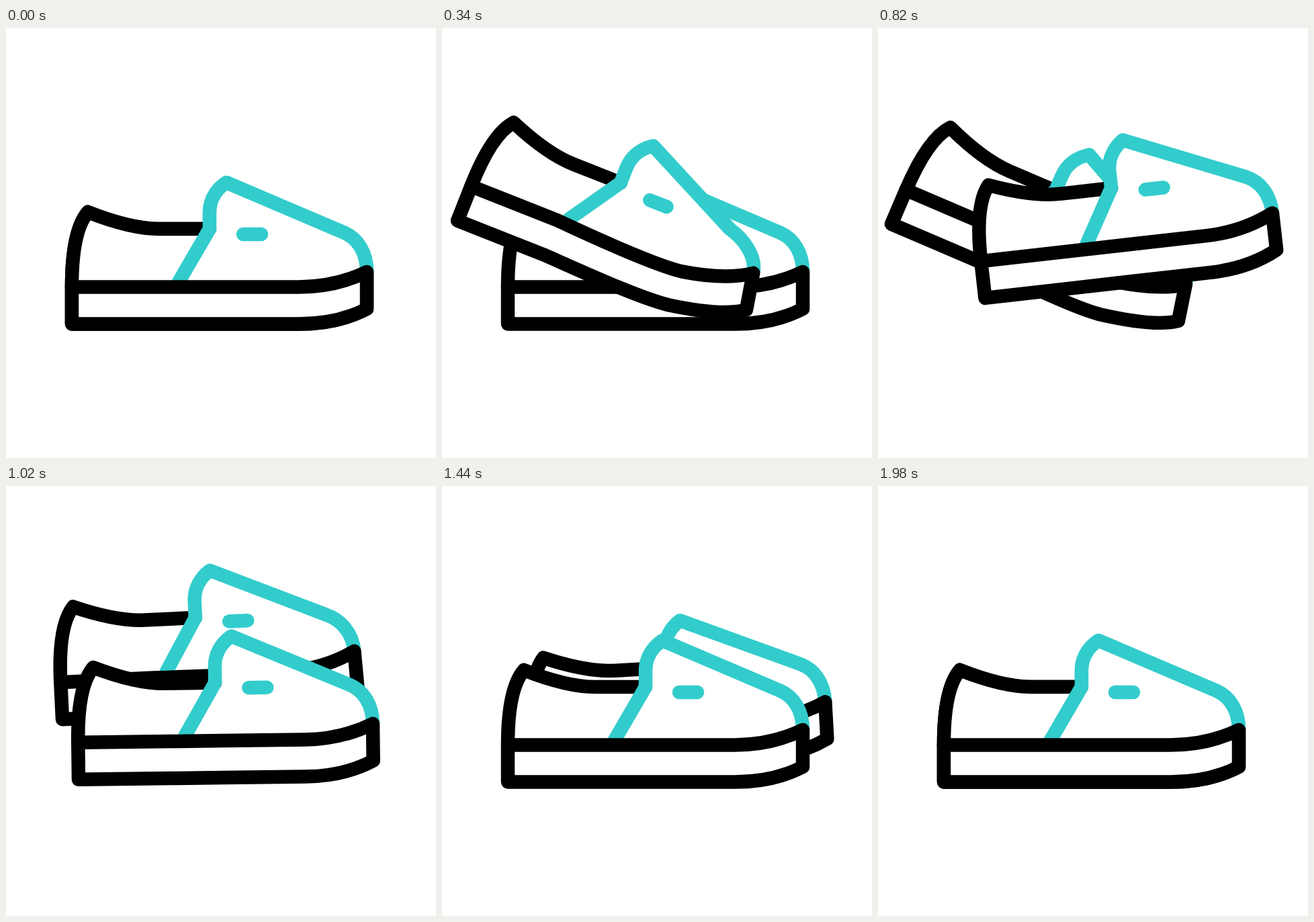
These frames come from a looping animation (640 by 640 pixels, 2400 ms). An HTML page:

```html
<!DOCTYPE html>
<html lang="en">
<head>
<meta charset="utf-8">
<title>Walking slip-ons</title>
<style>
  html, body { margin: 0; width: 100%; height: 100%; overflow: hidden; background: #fff; }
  svg { display: block; width: 100%; height: 100%; }
  path { fill: none; stroke-width: 20.5; stroke-linecap: round; stroke-linejoin: round; }
  .teal { stroke: #3cc; }
  .black { stroke: #000; }
  .white { fill: #fff; }
</style>
</head>
<body>
<svg viewBox="0 0 640 640" xmlns="http://www.w3.org/2000/svg">
  <g id="sparks"></g>
  <g id="shoes"></g>
</svg>
<script>
const LOOP = 2400;
const STEP_DELAY = 520;

// One step of a shoe: time, centre x, centre y, angle, toe bend
const STEP = [
  [0, 320, 340, 0, 0],
  [80, 296.5, 336.9, 6.9, 0.75],
  [300, 263.6, 287, 23.2, 1.08],
  [340, 266.4, 275.1, 21.6, 1],
  [540, 311, 228, -7.5, 0.1],
  [600, 326.5, 216.5, -11.6, 0],
  [720, 369.2, 235.3, -10.2, 0],
  [820, 368.8, 276.7, -6.5, 0],
  [1100, 320, 340, 0, 0]
];

// Radial strokes: direction, start radius, end radius, delay
const SPARK_CENTRE = [456, 214];
const SPARKS = [
  [-101.8, 62, 125, 0],
  [-56.5, 54, 131, 0],
  [-14.4, 120, 70, 45]
];

const clamp01 = v => Math.max(0, Math.min(1, v));

function add(parent, tag, className) {
  const node = document.createElementNS("http://www.w3.org/2000/svg", tag);
  if (className) node.setAttribute("class", className);
  return parent.appendChild(node);
}

function tangent(i, k) {
  if (i === 0 || i === STEP.length - 1) return 0;
  const [a, b, c] = [STEP[i - 1], STEP[i], STEP[i + 1]];
  const h0 = b[0] - a[0], h1 = c[0] - b[0];
  const s0 = (b[k] - a[k]) / h0, s1 = (c[k] - b[k]) / h1;
  return (s0 * h1 + s1 * h0) / (h0 + h1);
}

// Smooth cubic interpolation through the step keys
function poseAt(time) {
  const last = STEP.length - 1;
  const t = Math.max(0, Math.min(STEP[last][0], time));
  let i = 0;
  while (i < last - 1 && t > STEP[i + 1][0]) i++;
  const h = STEP[i + 1][0] - STEP[i][0];
  const u = (t - STEP[i][0]) / h, v = 1 - u;
  return [1, 2, 3, 4].map(k =>
    STEP[i][k] * (1 + 2 * u) * v * v + STEP[i + 1][k] * u * u * (3 - 2 * u) +
    h * u * v * (v * tangent(i, k) - u * tangent(i + 1, k)));
}

function makeShoe(parent) {
  const group = add(parent, "g");
  const fill = add(group, "path", "white");
  const back = add(group, "path", "black");
  const vamp = add(group, "path", "teal");
  const dash = add(group, "path", "teal");
  const sole = add(group, "path", "black white");
  const heelLine = "M98 385.4C98 340 103 296 122 274C155 287 193 299 228 299H303";
  back.setAttribute("d", heelLine);
  dash.setAttribute("d", "M353 307H380");

  return time => {
    const [x, y, angle, bend] = poseAt(time);
    const p = (px, py, dx, dy) => `${px + dx * bend} ${py + dy * bend} `;
    const toe = p(537, 363, -1, -11.5);
    const front = "V275C303 256 313 240 328 230L" + p(504, 305, -25, -2) +
      "C" + p(524, 314, -23.7, -5.6) + p(537, 335, -5.9, -11) + toe;
    fill.setAttribute("d", heelLine + front + "L436 390H98Z");
    vamp.setAttribute("d", "M" + p(257, 378, -6, 0) + "L303 299" + front);
    sole.setAttribute("d", "M98 385.4H236C" +
      p(300, 385.4, 0, 4) + p(390, 385.4, 0, 9) + p(436, 385.4, 0, 3) +
      "C" + p(475, 385.4, -0.6, -4) + p(510, 376, 1.5, -7) + toe +
      "L" + p(537, 418, 9.5, -12) +
      "C" + p(510, 432, 12, -7.4) + p(475, 440.5, -0.6, -5) + p(436, 440.5, 0, 1.5) +
      "C" + p(390, 440.5, 0, 7.5) + p(300, 440.5, 0, 2.5) + "236 440.5" +
      "L98 440.5Z");
    group.setAttribute("transform",
      `translate(${x} ${y}) rotate(${angle}) translate(-320 -340)`);
  };
}

function makeSpark(parent, [degrees, from, to, delay]) {
  const path = add(parent, "path", "teal");
  const rad = degrees * Math.PI / 180;
  const point = part => {
    const r = from + (to - from) * part;
    return `${SPARK_CENTRE[0] + r * Math.cos(rad)} ${SPARK_CENTRE[1] + r * Math.sin(rad)}`;
  };
  return time => {
    const head = clamp01((time - 1620 - delay) / 103);
    const tail = clamp01((time - 1830 - delay) / 103);
    path.setAttribute("d", head > tail ? `M${point(tail)}L${point(head)}` : "");
  };
}

const shoes = document.getElementById("shoes");
const rearShoe = makeShoe(shoes);
const frontShoe = makeShoe(shoes);
const sparks = SPARKS.map(s => makeSpark(document.getElementById("sparks"), s));

function draw(time) {
  frontShoe(time);
  rearShoe(time - STEP_DELAY);
  sparks.forEach(update => update(time));
}

const start = performance.now();
function tick() {
  draw((performance.now() - start) % LOOP);
  requestAnimationFrame(tick);
}
tick();
</script>
</body>
</html>
```
